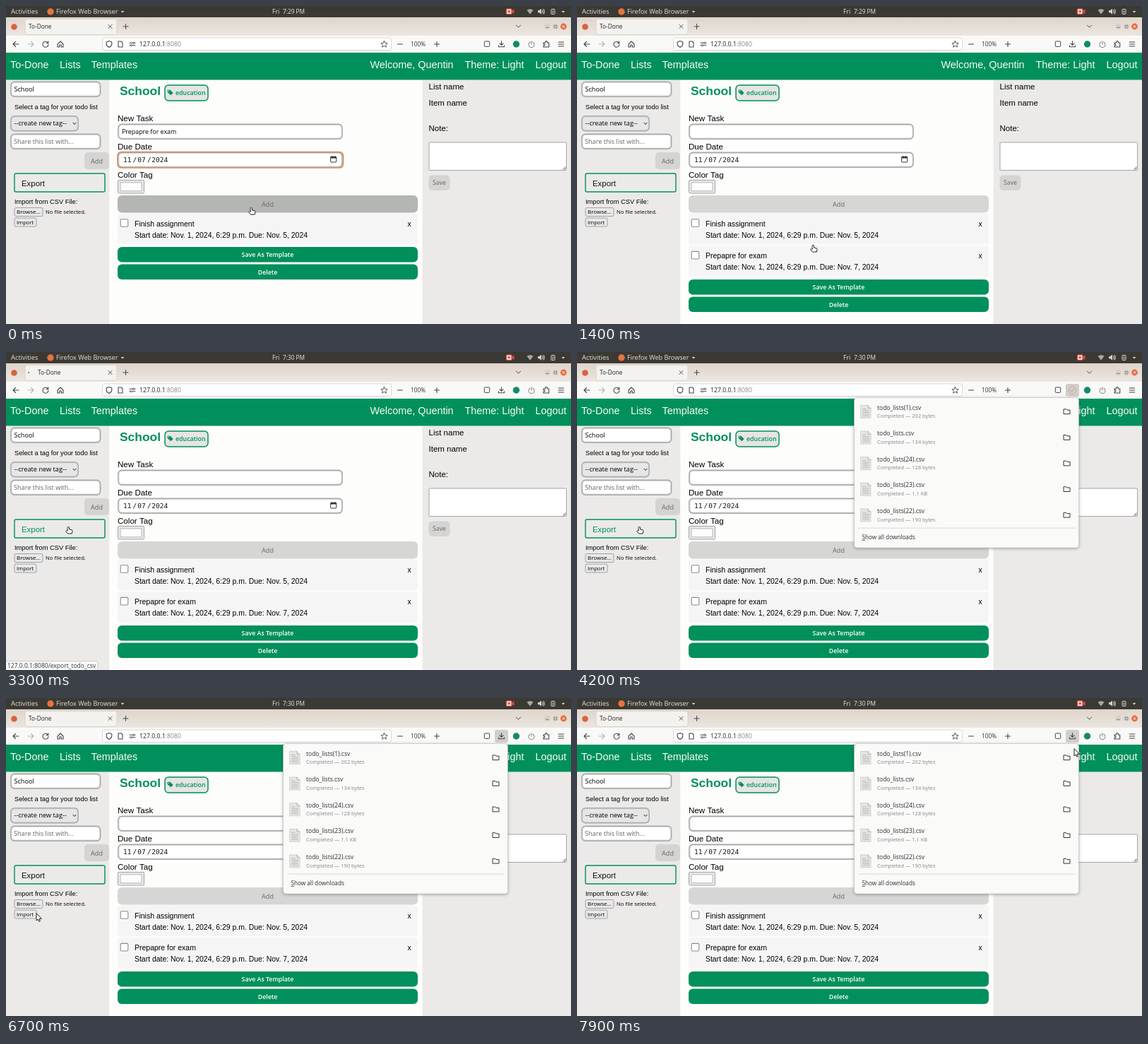
Write an HTML page with a canvas that moves like this. It is 800x450 px and loops after 8000 ms.

```html
<!DOCTYPE html>
<html lang="en">
<head>
<meta charset="utf-8">
<title>To-Done</title>
<style>
html, body { margin: 0; width: 100%; height: 100%; overflow: hidden; background: #fdfdfb; }
canvas { display: block; width: 800px; height: 450px; }
</style>
</head>
<body>
<canvas id="stage" width="800" height="450"></canvas>
<script>
const c = document.getElementById('stage').getContext('2d');
const LOOP = 8000;
const UI = '"Open Sans", "Noto Sans", sans-serif';
const SANS = '"Liberation Sans", Arial, sans-serif';
const MONO = '"DejaVu Sans Mono", monospace';
const GREEN = '#01905b', PANEL = '#ebeae8', INK = '#111', ICON = '#45454b';

function text(s, x, y, size, color = INK, font = UI, weight = 400, align = 'left') {
  c.font = `${weight} ${size}px ${font}`;
  c.textAlign = align;
  c.fillStyle = color;
  c.fillText(s, x, y);
}
const sans = (s, x, y, size = 11.6, color = '#000') => text(s, x, y, size, color, SANS);

function rect(x, y, w, h, color) {
  c.fillStyle = color;
  c.fillRect(x, y, w, h);
}
function box(x, y, w, h, r, fill, stroke, lw = 1) {
  c.beginPath();
  c.roundRect(x, y, w, h, r);
  if (fill) { c.fillStyle = fill; c.fill(); }
  if (stroke) { c.strokeStyle = stroke; c.lineWidth = lw; c.stroke(); }
}
function disc(x, y, r, fill, stroke, lw = 1) {
  c.beginPath();
  c.arc(x, y, r, 0, 7);
  if (fill) { c.fillStyle = fill; c.fill(); }
  if (stroke) { c.strokeStyle = stroke; c.lineWidth = lw; c.stroke(); }
}
// Draws SVG path data with its origin at x, y.
function icon(d, x, y, stroke = ICON, lw = 1.1, fill) {
  const p = new Path2D(d);
  c.save();
  c.translate(x, y);
  c.lineCap = c.lineJoin = 'round';
  if (fill) { c.fillStyle = fill; c.fill(p); }
  if (stroke) { c.strokeStyle = stroke; c.lineWidth = lw; c.stroke(p); }
  c.restore();
}
function field(x, y, w, h, fill = '#fff') {
  box(x + 1, y + 1, w - 2, h - 2, 5, fill, '#a9a9a9', 1.8);
  box(x + 2, y + 2, w - 4, h - 4, 4, null, '#d8d8d8', 1);
}
function button(label, y, h, fill, color, weight = 400) {
  box(158, y, 425, h, 6, fill);
  text(label, 370.5, y + h / 2 + 3.4, weight > 400 ? 8.8 : 9.1, color, UI, weight, 'center');
}

const CROSS = 'M-2.5-2.5L2.5 2.5M2.5-2.5L-2.5 2.5';
const PLUS = 'M-3.5 0H3.5M0-3.5V3.5';
const CARET = 'M-3-1.5L0 1.5L3-1.5';
const ARROW = 'M4 0H-4M-.5-3.5L-4 0L-.5 3.5';
const RELOAD = 'M3.3-2A4 4 0 1 0 4 .5M3.8-4V-1.3H1';
const FOLDER = 'M-4.3-3.3H-1L.2-2H4.3V3.5H-4.3Z';
const DOWNLOAD = 'M0-4V1.5M-2.5-.8L0 1.7L2.5-.8M-4 2V4H4V2';

function topBar(t) {
  rect(0, 0, 800, 16, '#3b3934');
  text('Activities', 7, 11.2, 9.4, '#e4e2dd');
  disc(63, 8, 4.7, '#e8743b');
  text('Firefox Web Browser', 71, 11.2, 9.1, '#e4e2dd', UI, 500);
  icon('M-2.3-1H2.3L0 1.7Z', 165, 8, null, 1, '#d8d5d0');
  text('Fri', 377, 11.2, 8.6, '#eceae6', UI, 500);
  text(t < 2300 ? '7:29 PM' : '7:30 PM', 392, 11.2, 8.3, '#eceae6', UI, 500);
  box(708.5, 4, 7.5, 7.5, 1, '#f1dcd8', '#dd4b3e', 1.2);
  disc(712.2, 7.7, 1.7, '#dd4b3e');
  icon('M0-1L3.5-3.2V3.2L0 1Z', 716, 7.7, null, 1, '#dd4b3e');
  icon('M-4.5-2Q0-5 4.5-2L0 4Z', 742, 7.8, null, 1, '#a9a7a2');
  icon('M-4-1.5H-2L1-4V4L-2 1.5H-4Z', 757, 7.8, null, 1, '#d8d5d0');
  icon('M2.5-2Q4 0 2.5 2M4.2-3.3Q6.3 0 4.2 3.3', 757, 7.8, '#d8d5d0');
  box(772, 4.5, 5, 7, 1, null, '#d8d5d0');
  icon('M.5-2L-1 .3H1L-.5 2.2', 774.5, 8, '#d8d5d0', .8);
  icon('M-2.3-1H2.3L0 1.7Z', 789, 8, null, 1, '#d8d5d0');
}

function tabs(t) {
  const strip = c.createLinearGradient(0, 16, 0, 42);
  strip.addColorStop(0, '#dfd5cb');
  strip.addColorStop(1, '#ebe6e0');
  rect(0, 16, 800, 26, strip);
  box(27, 18.5, 130, 22, 3, '#f4f2ee', '#d3cec8', .8);
  disc(11.5, 29.5, 4.3, '#d9623f');
  const loading = (t >= 100 && t < 400) || (t >= 3000 && t < 3700);
  const burst = (t - 400) / 400;
  if (burst >= 0 && burst < 1) {
    c.globalAlpha = Math.min(1, 1.6 * (1 - burst)) * .75;
    disc(37.5, 29, 4 + 16 * Math.min(burst, .25), '#85c1b5');
    c.globalAlpha = 1;
  }
  if (loading) disc(33 + 2 * Math.sin(t / 180), 29, 1, '#55555a');
  text('To-Done', loading ? 45 : 32, 32.2, 8.3, '#222');
  icon(CROSS, 147.5, 29, ICON, .9);
  icon(PLUS, 169.5, 29, ICON, 1);
  icon(CARET, 725.5, 28.8, ICON, 1);
  disc(766.5, 29, 4, '#d8cfc6');
  disc(778, 29, 4, '#d8cfc6');
  disc(789.5, 29, 4.4, '#e9683c');
  icon('M-2 1.5H2', 766.5, 29, '#777', .8);
  box(776.2, 27.3, 3.6, 3.6, 0, null, '#777', .8);
  icon('M-1.6-1.6L1.6 1.6M1.6-1.6L-1.6 1.6', 789.5, 29, '#fff', .9);
}

function toolbar(t) {
  rect(0, 42, 800, 24, '#f9f9f8');
  icon(ARROW, 14, 54);
  icon('M-4 0H4M.5-3.5L4 0L.5 3.5', 35, 54, '#b5b5b8');
  if (t >= 100 && t < 800) icon('M-3-3L3 3M3-3L-3 3', 56, 54, '#aaaaad');
  else icon(RELOAD, 56, 54);
  icon('M-4 0L0-4L4 0V4H1.2V1H-1.2V4H-4Z', 77, 54);
  box(136.5, 45, 409, 17.5, 3, '#fff', '#cfcfce', .8);
  icon('M0-4.5L3.8-3V0Q3.5 3 0 4.5Q-3.5 3-3.8 0V-3Z', 146, 54);
  icon('M-3-4H1L3-2V4H-3Z', 162, 54);
  icon('M-4-1.7H.5M3.2-1.7H4M-4 1.7H-3M0 1.7H4', 179, 54);
  disc(180.8, 52.3, 1.2, null, ICON, .9);
  disc(177.4, 55.7, 1.2, null, ICON, .9);
  text('127.0.0.1', 189, 57.1, 8.7, '#222');
  const port = 189 + c.measureText('127.0.0.1').width;
  text(':8080', port, 57.1, 8.7, '#88888c');
  icon('M0-4.6L1.4-1.5L4.6-1.2L2.2 1L2.9 4.2L0 2.5L-2.9 4.2L-2.2 1L-4.6-1.2L-1.4-1.5Z', 535.5, 54, ICON, .9);
  icon('M-3.5 0H3.5', 558, 54);
  text('100%', 573, 57, 8.3, '#333');
  icon(PLUS, 610, 54);
  box(677.3, 50, 7.4, 7.4, 1, null, ICON);

  if (t >= 3900) box(692, 45, 19, 18, 3, '#cfcfcd');
  if (t >= 3900 && t < 5000) {
    disc(701.5, 54, 5.3, null, '#dfa48e', 1);
    icon('M-2.3 0L-.7 1.8L2.4-1.8', 701.5, 54, '#dc8a6c', 1);
  } else {
    icon(DOWNLOAD, 701.5, 53.7);
  }
  disc(722.5, 54, 4.7, '#138a69');
  icon('M-2-3A4 4 0 1 0 2-3M0-4.5V0', 744, 54.2, '#8e8e91');
  icon('M-4-2H-1.3C-2.2-5.2 2.2-5.2 1.3-2H3.7V4H-4V2C-1.3 2.6-1.3-.6-4 0Z', 765, 54);
  icon('M-3.7-3H3.7M-3.7 0H3.7M-3.7 3H3.7', 786, 54);
}

function leftPanel(hover) {
  rect(0, 104.5, 146.5, 346, PANEL);
  field(6, 106.5, 128.5, 22.5);
  text('School', 11.5, 121, 9.1, '#000', UI, 500);
  sans('Select a tag for your todo list', 12, 145.6, 9.3);
  field(6, 155, 97, 22.5, '#e6e6e7');
  text('--create new tag--', 11.5, 169.4, 9.2, '#000', UI, 500);
  icon('M-2-1.2L0 1L2-1.2', 97, 166.5, '#222', 1);
  field(6, 180.5, 128.5, 22.5);
  text('Share this list with...', 11, 195, 9.15, '#66666a');
  box(111, 207, 35, 24, 5, '#d5d4d2');
  text('Add', 128.5, 222.5, 9.1, '#66666a', UI, 400, 'center');
  box(12, 237, 128, 26, 2, PANEL, GREEN, 1.4);
  sans('Export', 22, 254.8, 11.4, hover ? GREEN : '#111');
  sans('Import from CSV File:', 12, 280, 9.3);
  box(12, 285.5, 40, 12, 2, '#e9e9ea', '#8f8f95', .8);
  text('Browse...', 15, 294.4, 8, '#000');
  text('No file selected.', 56, 294.4, 7.7, '#000');
  box(12, 300, 31, 12, 2, '#e9e9ea', '#8f8f95', .8);
  text('Import', 15, 308.9, 7.6, '#000');
}

function task(y, title, day) {
  box(158, y, 425, 44, 4, '#f6f5f5');
  box(162.2, y + 8.2, 10.6, 10.6, 1.5, '#fff', '#8a8a94', 1.1);
  sans(title, 182, y + 18, 10.5);
  sans('x', 568.5, y + 18, 10.5);
  sans(`Start date: Nov. 1, 2024, 6:29 p.m. Due: Nov. ${day}, 2024`, 182, y + 34, 10.45);
}

function mainPanel(t, saved) {
  rect(146.5, 104.5, 443, 346, '#fdfdfb');
  text('School', 161, 125.8, 17.4, GREEN, SANS, 700);
  box(225, 112, 61, 22, 5, '#e5e5e4', GREEN, 1.5);
  icon('M-4-3.5H-.3L4 .7L.7 4L-4-.3Z', 232.7, 122.2, null, 1, GREEN);
  disc(230.5, 120.3, .8, '#e5e5e4');
  text('education', 240, 126.3, 8.8, GREEN, UI, 600);

  sans('New Task', 158, 163);
  field(158, 166.5, 319, 22.5);
  if (!saved) text('Prepapre for exam', 164, 181, 8.9, '#000', UI, 500);
  sans('Due Date', 158, 203);
  field(158, 206.5, 319, 22.5);
  if (!saved) box(158, 206.5, 319.5, 22.5, 5.5, null, '#cf9268', 1.6);
  [['11', 166], ['/', 179.5], ['07', 186.3], ['/', 200], ['2024', 206.3]]
    .forEach(([s, x]) => text(s, x, 221, 9.5, INK, MONO));
  box(459.7, 213.5, 8, 7.5, 1, null, '#333', 1);
  rect(459.5, 213.3, 8.4, 2.2, '#333');
  rect(461, 212, 1.2, 2, '#333');
  rect(465.2, 212, 1.2, 2, '#333');
  sans('Color Tag', 158, 243);
  box(158.5, 246.5, 37, 18.5, 1.5, '#e9e9ea', '#9a9a9e', .9);
  box(162, 249.8, 30, 12, 0, '#fcfcfc', '#a8a8a8', .8);

  button('Add', 268, 24.5, !saved ? '#b4b6b3' : t < 1100 ? '#cfcfcd' : '#d6d6d4', '#686868');
  task(293.5, 'Finish assignment', 5);
  if (saved) task(339.2, 'Prepapre for exam', 7);
  const y = saved ? 387 : 341;
  button('Save As Template', y, 21.5, GREEN, '#fff', 600);
  button('Delete', y + 24.5, 21.5, GREEN, '#fff', 600);
}

function rightPanel() {
  rect(589.5, 104.5, 211, 346, PANEL);
  sans('List name', 598.5, 117.5, 11.5);
  sans('Item name', 598.5, 141.3, 11.5);
  sans('Note:', 598.5, 177, 11.5);
  box(599, 193, 194.5, 39.5, 1, '#fff', '#9b9ba0', .9);
  icon('M0-5V0H-5Z', 792.5, 231.5, null, 1, '#a9a9ac');
  box(598.5, 239.5, 30, 21.5, 5, '#d5d4d2');
  text('Save', 613.5, 253.3, 8.7, '#66666a', UI, 400, 'center');
}

function navBar() {
  rect(0, 66, 800, 38.5, GREEN);
  [['To-Done', 6], ['Lists', 76], ['Templates', 120.5], ['Welcome, Quentin', 515.5],
   ['Theme: Light', 649.5], ['Logout', 749.5]]
    .forEach(([s, x]) => sans(s, x, 88.3, 14.4, '#f4fbf7'));
}

function downloads() {
  c.save();
  c.shadowColor = 'rgba(0,0,0,.35)';
  c.shadowBlur = 4;
  c.shadowOffsetY = 1;
  box(392.5, 64.5, 318, 212.5, 4, '#fafaf9');
  c.restore();
  box(392.5, 64.5, 318, 212.5, 4, null, '#c4c4c2', .7);
  [['(1)', '202 bytes'], ['', '134 bytes'], ['(24)', '128 bytes'], ['(23)', '1.1 KB'], ['(22)', '190 bytes']]
    .forEach(([n, size], i) => {
      const y = 84.5 + i * 36.6;
      icon('M-7-9H3L7-5V9H-7Z', 409, y, '#c8c8c5', .8, '#e6e6e3');
      icon('M3-9V-5H7M-4.5-4H0M-4.5-1.5H4.5M-4.5 1H4.5M-4.5 3.5H4.5M-4.5 6H4.5', 409, y, '#adadaa', .8);
      text(`todo_lists${n}.csv`, 425, y - 3, 8.5, '#2d2d30', UI, 500);
      text(`Completed — ${size}`, 425, y + 8.7, 7.45, '#858588');
      icon(FOLDER, 693.7, y - .3, '#333', 1);
    });
  rect(398, 248.7, 307, .8, '#cfcfcd');
  text('Show all downloads', 403.5, 264.7, 8.2, '#2d2d30');
  rect(403.5, 266, 4.5, .7, '#2d2d30');
}

// Pointer path: time, x, y of its hot spot.
const PATH = [[0, 347, 286], [1000, 347, 286], [1400, 334, 339], [1900, 334, 339], [2600, 88, 248],
  [5300, 88, 248], [6200, 43, 305], [7000, 43, 305], [7700, 704, 72], [8000, 704, 72]];
function pointer(t) {
  const i = PATH.findIndex(p => p[0] > t);
  const [t0, x0, y0] = PATH[i - 1], [t1, x1, y1] = PATH[i];
  let k = (t - t0) / (t1 - t0);
  k = k * k * (3 - 2 * k);
  return [x0 + (x1 - x0) * k, y0 + (y1 - y0) * k];
}

function draw(t) {
  const [x, y] = pointer(t);
  const hover = x > 11 && x < 141 && y > 236 && y < 263;
  c.clearRect(0, 0, 800, 450);
  leftPanel(hover);
  mainPanel(t, t >= 300);
  rightPanel();
  navBar();
  topBar(t);
  tabs(t);
  toolbar(t);
  if (t >= 3900) downloads();
  if (hover && t < 3800) {
    box(-2, 437.5, 132, 15, 3, '#f7f7f6', '#c5c5c3', .8);
    text('127.0.0.1:8080/export_todo_csv', 2, 447, 8.5, '#3d3d40');
  }
  if (hover || t < 1950)
    icon('M-1 1Q-1-.7 .3-.7T1.5 1V3L5 3.8Q6 4 6 5.2L5.2 9H-.5L-3.5 5.5Q-3.2 4-1 5Z', x, y, '#222', 1, '#fff');
  else
    icon('M0 0V10L2.3 8L3.8 11.3L5.4 10.6L4 7.3H7Z', x, y, '#222', 1, '#fff');
}

function frame() {
  draw(performance.now() % LOOP);
  requestAnimationFrame(frame);
}
frame();
</script>
</body>
</html>
```
